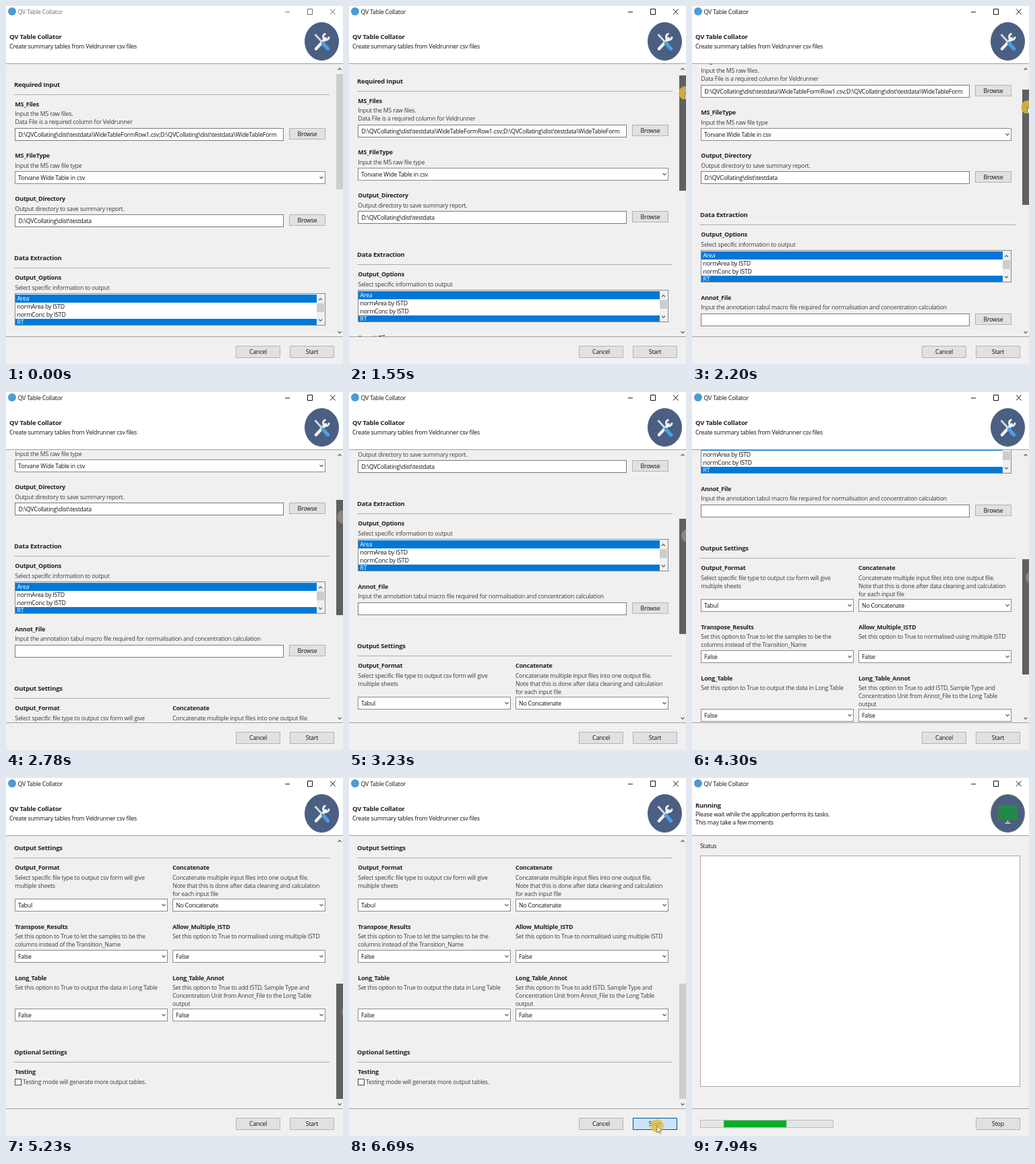
Animation of 500x531 px, one loop 8000 ms. Source, as an HTML page:

```html
<!DOCTYPE html>
<html lang="en">
<head>
<meta charset="utf-8">
<title>QV Table Collator</title>
<style>
html, body { margin: 0; width: 100%; height: 100%; overflow: hidden; background: #f0f0f0; }
svg { display: block; }
text { font: 8.8px 'Open Sans', 'Noto Sans', sans-serif; letter-spacing: -.22px; fill: #111; }
.head { font-size: 9.5px; font-weight: 700; fill: #222; }
.label { font-size: 9px; font-weight: 700; fill: #222; }
.note { fill: #3c3c3c; }
.mid { text-anchor: middle; }
.lit { fill: #fff; }
</style>
</head>
<body>
<svg id="stage" width="500" height="531" viewBox="0 0 500 531"></svg>
<script>
const LOOP = 8000;
const RUN_AT = 7030;

// --- drawing helpers; text y is the middle of the line ---
const text = (x, y, s, cls = '') => `<text x="${x}" y="${y + 3}" class="${cls}">${s}</text>`;
const rect = (x, y, w, h, fill, more = '') =>
  `<rect x="${x}" y="${y}" width="${w}" height="${h}" fill="${fill}" ${more}/>`;
const box = (x, y, w, h, fill, line, id = '') =>
  rect(x + .5, y + .5, w - 1, h - 1, fill, `stroke="${line}" id="${id}"`);
const path = (d, stroke, width = 1, more = '') =>
  `<path d="${d}" fill="none" stroke="${stroke}" stroke-width="${width}" ${more}/>`;
const clip = (x, y, w, h, inner) =>
  `<svg x="${x}" y="${y}" width="${w}" height="${h}" viewBox="${x} ${y} ${w} ${h}">${inner}</svg>`;
const chevron = (x, y, dir = 1) =>
  path(`M${x - 2.5} ${y - 1.3 * dir}l2.5 ${2.6 * dir}l2.5 ${-2.6 * dir}`, '#444', 1.1);
const button = (x, y, w, h, s, id) =>
  box(x, y, w, h, '#e1e1e1', '#b4b4b4', id) + text(x + w / 2, y + h / 2, s, 'mid');
const lines = (x, y, list) => list.map((s, i) => text(x, y + 12 * i, s, 'note')).join('');
const section = (y, s) => text(12, y, s, 'head') + rect(12, y + 14, 468, 1, '#acacac');
const field = (x, y, name, notes) => text(x, y, name, 'label') + lines(x, y + 14.5, notes);
const fileBox = (y, s) => box(13, y, 399, 19, '#fff', '#7a7a7a') +
  clip(14, y, 396, 19, text(18.5, y + 9.5, s)) + button(420, y, 54, 17, 'Browse');
const combo = (x, y, right, s) => box(x, y, right - x, 19, '#fff', '#8a8a8a') +
  text(x + 5, y + 9.5, s) + chevron(right - 6, y + 9.5);

// --- form page ---
const folder = 'D:\\QVCollating\\dist\\testdata';
const table = folder + '\\WideTableForm';

const listBox = () => box(13, 426, 461, 48, '#fff', '#828790') + clip(14, 427, 459, 46,
  rect(14, 428, 447, 12, '#0078d7') + rect(14, 464, 447, 12, '#0078d7') +
  ['Area', 'normArea by ISTD', 'normConc by ISTD', 'RT']
    .map((s, i) => text(16.5, 434 + 11.8 * i, s, i % 3 ? '' : 'lit')).join('') +
  rect(461, 427, 12, 46, '#f0f0f0') + rect(461, 441, 11, 13, '#cdcdcd') +
  chevron(466.5, 435, -1) + chevron(466.5, 466));

const form =
  section(117, 'Required Input') +
  field(13.3, 145.5, 'MS_Files', ['Input the MS raw files.', 'Data File is a required column for Veldrunner']) +
  fileBox(181, `${table}Row1.csv;${table}`) +
  field(13.3, 222, 'MS_FileType', ['Input the MS raw file type']) +
  combo(13, 245, 474, 'Torvane Wide Table in csv') +
  field(13.3, 286, 'Output_Directory', ['Output directory to save summary report.']) +
  fileBox(309, folder) +
  section(374, 'Data Extraction') +
  field(13.3, 403, 'Output_Options', ['Select specific information to output']) +
  listBox() +
  field(13.3, 496.5, 'Annot_File',
    ['Input the annotation tabul macro file required for normalisation and concentration calculation']) +
  fileBox(520, '') +
  section(585, 'Output Settings') +
  field(13.3, 614, 'Output_Format', ['Select specific file type to output csv form will give', 'multiple sheets']) +
  field(247, 614, 'Concatenate', ['Concatenate multiple input files into one output file.',
    'Note that this is done after data cleaning and calculation', 'for each input file']) +
  combo(13, 660, 240, 'Tabul') + combo(247, 660, 474, 'No Concatenate') +
  field(13.3, 701.5, 'Transpose_Results', ['Set this option to True to let the samples to be the',
    'columns instead of the Transition_Name']) +
  field(247, 701.5, 'Allow_Multiple_ISTD', ['Set this option to True to normalised using multiple ISTD']) +
  combo(13, 736, 240, 'False') + combo(247, 736, 474, 'False') +
  field(13.3, 777.5, 'Long_Table', ['Set this option to True to output the data in Long Table']) +
  field(247, 777.5, 'Long_Table_Annot', ['Set this option to True to add ISTD, Sample Type and',
    'Concentration Unit from Annot_File to the Long Table', 'output']) +
  combo(13, 823, 240, 'False') + combo(247, 823, 474, 'False') +
  section(888, 'Optional Settings') +
  text(13.3, 917, 'Testing', 'label') +
  box(13, 927, 10, 10, '#fff', '#444') + text(25, 932, 'Testing mode will generate more output tables.', 'note');

// --- window parts ---
const disc = line => `<ellipse cx="468.5" cy="52.5" rx="25" ry="28" fill="#4a5f82" stroke="${line}"/>`;
const tools = disc('#4a5f82') +
  path('M460 63.5L474 48.5', '#f2f2f2', 4.5, 'stroke-linecap="round"') +
  path('M479 45.5a4.2 4.6 0 1 1-4.5-4.3', '#f2f2f2', 3) +
  path('M458.5 42L469 53.5', '#d5dbe2', 2.8) +
  path('M470.5 55.5L477.5 63.5', '#4a9fe6', 5.5, 'stroke-linecap="round"');
const monitor = disc('#6f8a55') +
  rect(454.5, 40.5, 28, 22, '#1f8a4c', 'rx="2" stroke="#5f6b40" stroke-width="1.2"') +
  path('M468.5 63v3.5M464.5 67h8', '#d9dccb', 1.4);

const setup = `<g id="setup">
  ${text(5, 46, 'QV Table Collator', 'head')}
  ${text(5, 59.5, 'Create summary tables from Veldrunner csv files')}
  ${tools}
  ${clip(0, 86, 490, 404, `<g id="page">${form}</g>`)}
  ${chevron(495, 93.5, -1)}${chevron(495, 484)}
  ${rect(490, 101, 10, 171, '#cdcdcd', 'id="thumb"')}
  ${button(341, 504, 66, 18, 'Cancel')}${button(421, 504, 66, 18, 'Start', 'start')}
</g>`;

const running = `<g id="running">
  ${text(5, 40.5, 'Running', 'head')}
  ${text(5, 53.5, 'Please wait while the application performs its tasks.')}
  ${text(5, 66, 'This may take a few moments')}
  ${monitor}
  ${text(12, 101, 'Status')}
  ${box(12, 115, 475, 343, '#fff', '#a9a9a9')}
  ${box(12, 507, 198, 12, '#e6e6e6', '#bcbcbc')}
  ${clip(13, 508, 196, 10, rect(0, 508, 93, 10, '#06b025', 'id="bar"'))}
  ${button(421, 504, 66, 18, 'Stop')}
</g>`;

document.getElementById('stage').innerHTML =
  rect(0, 0, 500, 531, '#f0f0f0') + rect(0, 0, 500, 85, '#fff') +
  '<circle cx="9" cy="8" r="6" fill="#4b9cd3"/>' +
  `<g id="titlebar">${text(17.5, 8.5, 'QV Table Collator')}
    ${path('M414 9h7M447.5 4.5h7v8h-7zM481 4.5l7.5 8M488.5 4.5l-7.5 8', '#111')}</g>` +
  rect(0, 85, 500, 1, '#a0a0a0') + rect(0, 490, 500, 1, '#a0a0a0') +
  setup + running +
  `<g id="pointer"><circle r="10" id="halo" fill-opacity=".8"/>
    <path d="M0 0v10l2.3-2l1.7 3.6l1.6-.8l-1.7-3.4h3z" fill="#fff" stroke="#333" stroke-width=".6"/></g>`;

// --- motion: time, scroll, thumb top, pointer x, pointer y ---
const track = [
  [810, 0, 101, 514, 127], [1150, 0, 101, 500, 127], [1460, 0, 101, 499, 127],
  [1830, 20, 109, 498, 135], [2200, 64, 124, 498, 150], [3230, 208, 188, 503, 213],
  [3710, 272, 213, 505, 240], [4300, 353, 248, 505, 275], [5230, 481, 305, 508, 347],
  [5760, 481, 305, 508, 352], [6500, 481, 305, 457, 516], [RUN_AT, 481, 305, 457, 516],
  [7300, 481, 305, 462, 545]
];
const clamp = v => Math.min(1, Math.max(0, v));
const mix = (a, b, k) => a + (b - a) * k;

function pose(t) {
  let i = 0;
  while (i < track.length - 2 && t > track[i + 1][0]) i++;
  const [a, b] = [track[i], track[i + 1]];
  const k = clamp((t - a[0]) / (b[0] - a[0]));
  return a.slice(1).map((v, j) => mix(v, b[j + 1], k));
}

function thumbShade(t) {
  if (t < 1460) return mix(205, 166, clamp((t - 810) / 340));
  return mix(96, 205, clamp((t - 5760) / 300));
}

const $ = id => document.getElementById(id);
const set = (id, attrs) => Object.entries(attrs).forEach(([k, v]) => $(id).setAttribute(k, v));

function draw(now) {
  const t = now % LOOP;
  const [scroll, top, x, y] = pose(t);
  const shade = Math.round(thumbShade(t));
  const done = t >= RUN_AT;
  const hover = t >= 6380, press = t >= 6690;

  set('setup', { display: done ? 'none' : 'inline' });
  set('running', { display: done ? 'inline' : 'none' });
  set('titlebar', { opacity: t < 1460 ? .6 : 1 });
  set('page', { transform: `translate(0 ${-Math.round(scroll)})` });
  set('thumb', { y: Math.round(top), fill: `rgb(${shade},${shade},${shade})` });
  set('start', {
    fill: press ? '#cce4f7' : hover ? '#e5f1fb' : '#e1e1e1',
    stroke: press ? '#005499' : hover ? '#0078d7' : '#b4b4b4'
  });
  set('pointer', { transform: `translate(${x} ${y})` });
  set('halo', { fill: t > 2300 && t < 5760 ? '#9c8c80' : '#e6c03c' });
  set('bar', { x: 47 - .16 * (7940 - t) });
  requestAnimationFrame(draw);
}
requestAnimationFrame(draw);
</script>
</body>
</html>
```
